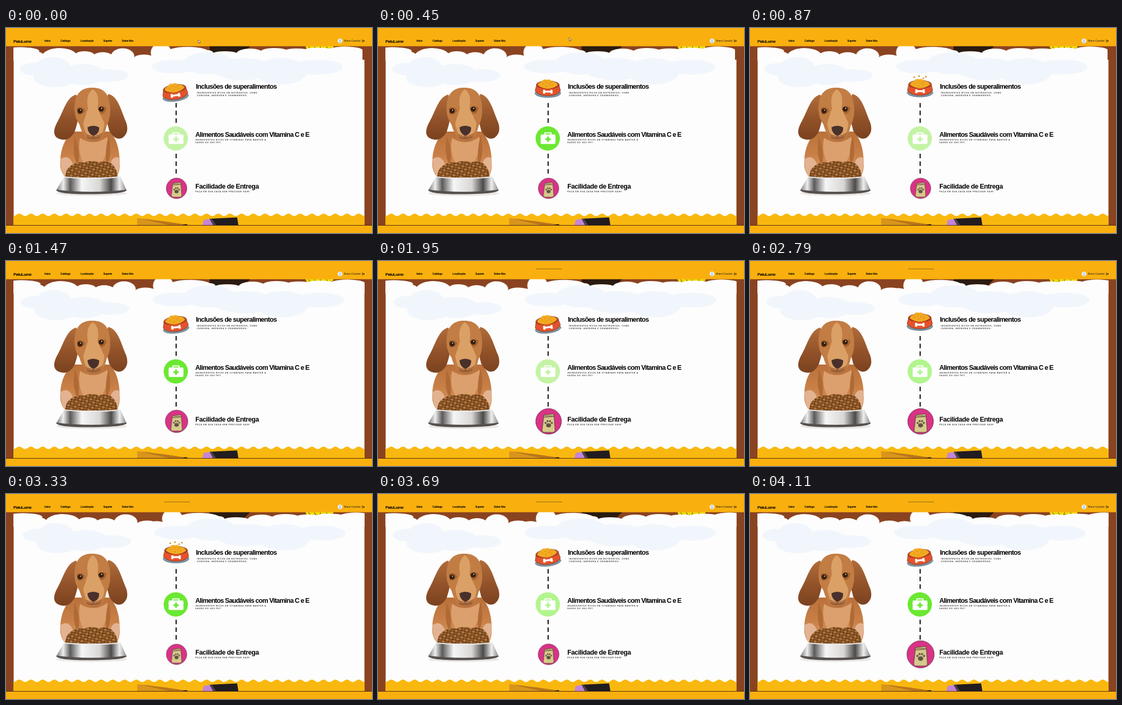
An HTML page for the animation above (4.14 s loop, 692 by 388 pixels).

```html
<!DOCTYPE html>
<html lang="pt">
<head>
<meta charset="utf-8">
<title>PatuLume</title>
<style>
html, body { margin: 0; width: 100%; height: 100%; overflow: hidden; background: #8a4320; }
svg { display: block; width: 692px; height: 388px; }
text { font-family: "Liberation Sans", Arial, sans-serif; font-weight: 700; }
.logo { font-size: 8px; letter-spacing: -.55px; }
.nav { font-size: 5px; letter-spacing: -.35px; }
.user { font: 400 4.9px Roboto, sans-serif; fill: #2b2418; }
.title { font-size: 12.5px; letter-spacing: -.7px; }
.note { font-size: 3.6px; letter-spacing: .83px; fill: #3a3a3a; }

/* Every part shares one loop length. */
.anim { animation: 4.14s linear infinite; }
.haze { animation-name: haze; }
.drift { animation-name: drift; }
.sway { animation-name: sway; }
.bowl { animation-name: bowl; animation-timing-function: ease-in-out; }
.toss { animation-name: toss; }
.kit { animation-name: glow; }
.bag { animation-name: beat; animation-timing-function: ease-in-out; }
.cursor { animation-name: cursor; }
.strip { animation-name: strip; }

@keyframes haze {
  0% { transform: none; }
  21% { transform: translateX(1px); }
  47% { transform: translateX(3px); }
  67% { transform: translateX(5px); }
  82% { transform: translateX(5.5px); }
  100% { transform: translateX(-3px); }
}
@keyframes sway {
  0% { transform: none; }
  80% { transform: translateX(6px); }
  100% { transform: translateX(2px); }
}
@keyframes drift {
  0% { transform: none; }
  35% { transform: translateX(4px); }
  67% { transform: translateX(16px); }
  100% { transform: translateX(29px); }
}
@keyframes bowl {
  0% { transform: translate(319.5px, 121px) rotate(-8deg); }
  8% { transform: translate(321px, 114px); }
  21%, 80.4% { transform: translate(321.5px, 113px); }
  30%, 47.1%, 90%, 100% { transform: translate(320.5px, 119px) rotate(-7deg); }
  59.4% { transform: translate(319.5px, 121px) rotate(-8deg); }
  67.4% { transform: translate(321px, 114px); }
}
@keyframes toss {
  0%, 12%, 29%, 71%, 89%, 100% { transform: translateY(10px); opacity: 0; }
  15%, 26%, 74%, 86% { opacity: 1; }
  21%, 80.4% { transform: none; opacity: 1; }
}
@keyframes glow {
  0%, 4%, 21%, 45%, 52%, 66% { color: #c4f3a6; }
  10%, 15%, 32%, 39%, 55%, 61%, 77.5%, 83.5%, 99%, 100% { color: #6be832; }
  26%, 67.4%, 71%, 89%, 93% { color: #b2f58f; }
}
@keyframes beat {
  0%, 59.4% { transform: translate(322.5px, 303.5px) scale(.757); }
  21%, 80.4% { transform: translate(322.5px, 303.5px) scale(.75); }
  34.3%, 93.7% { transform: translate(322.5px, 303.5px) scale(.77); }
  35.5%, 94.9% { transform: translate(322.5px, 303.5px) scale(.827); }
  39.9%, 99.3%, 100% { transform: translate(322.5px, 303.5px) scale(1); }
  47.1%, 67.4% { transform: translate(322.5px, 303.5px) scale(.942); }
}
@keyframes cursor {
  0%, 4% { transform: none; opacity: 1; }
  13.7% { transform: translate(-3px, -6px); opacity: 1; }
  13.8%, 100% { opacity: 0; }
}
@keyframes strip {
  0%, 40.9% { opacity: 0; }
  41%, 100% { opacity: 1; }
}
</style>
</head>
<body>
<svg viewBox="0 0 692 388">
  <defs>
    <clipPath id="page"><path d="M14.5 34H677.7V374H14.5Z"/></clipPath>
    <pattern id="wave" x="3" y="350" width="22.13" height="8" patternUnits="userSpaceOnUse">
      <path d="M0 1.2C4 1.2 7 5.8 11.07 5.8S18.1 1.2 22.13 1.2V8H0Z" fill="#f9b80f"/>
    </pattern>
    <pattern id="grain" width="13" height="10" patternUnits="userSpaceOnUse" patternTransform="rotate(12)">
      <path d="M0 0H13V10H0Z" fill="#6b3d18"/>
      <g fill="#b27a40"><ellipse cx="3.4" cy="2.6" rx="3" ry="2.1"/><ellipse cx="9.6" cy="7.4" rx="2.8" ry="2.1"/></g>
      <g fill="#965c2a"><ellipse cx="9.8" cy="2.4" rx="2.7" ry="2"/><ellipse cx="3.2" cy="7.4" rx="2.7" ry="1.9"/></g>
    </pattern>
    <linearGradient id="steel">
      <stop stop-color="#777"/><stop offset=".1" stop-color="#eee"/><stop offset=".2" stop-color="#5c5a59"/>
      <stop offset=".36" stop-color="#f6f6f6"/><stop offset=".62" stop-color="#d8d6d5"/>
      <stop offset=".78" stop-color="#4c4a49"/><stop offset=".9" stop-color="#eee"/><stop offset="1" stop-color="#888"/>
    </linearGradient>
    <linearGradient id="fur" x2="0" y2="1">
      <stop stop-color="#b9703a"/><stop offset=".5" stop-color="#c98148"/><stop offset="1" stop-color="#dda273"/>
    </linearGradient>
    <linearGradient id="ear" x2="0" y2="1">
      <stop stop-color="#b06c3a"/><stop offset=".6" stop-color="#8f5028"/><stop offset="1" stop-color="#7a421f"/>
    </linearGradient>
  </defs>

  <path d="M0 0H692V388H0Z" fill="#8a4320"/>

  <g clip-path="url(#page)">
    <path d="M385 34H462L440 56H385Z" fill="#2b1a10"/>
    <path d="M566 34H619V37L614 39 609 42 605 38 600 42 597 38 592 42 588 39 584 43 581 39 576 42 573 39 569 41Z" fill="#efd90c"/>
    <path d="M572 35l4 5M583 35l3 5M595 35l-2 5M606 35l2 4" stroke="#4d4208"/>
    <path d="M14 60H678V356H14Z" fill="#fdfdfd"/>
    <g fill="#fdfdfd">
      <path class="anim sway" d="M-10 62V42a36 7 0 0 1 72 3q5 1 8 4a33 16 0 0 1 62 -1a19 8 0 0 1 35 2a19 9 0 0 1 32 0a22 15 0 0 1 43 7a17 6 0 0 1 38 0V62Z"/>
      <path class="anim drift" d="M245 62V57a20 9 0 0 1 30 -4a18 17 0 0 1 36 -13a40 10 0 0 1 70 2q9 0 11 5a24 5 0 0 1 44 0a26 10 0 0 1 46 -4a28 8 0 0 1 48 -2a24 5 0 0 1 36 -1a26 4 0 0 1 46 -1a34 8 0 0 1 62 2V62Z"/>
    </g>
    <g class="anim haze" fill="#f1f6fc">
      <ellipse cx="54" cy="78" rx="28" ry="12"/>
      <ellipse cx="88" cy="76" rx="34" ry="21"/>
      <ellipse cx="92" cy="94" rx="40" ry="18"/>
      <ellipse cx="145" cy="88" rx="42" ry="20"/>
      <ellipse cx="195" cy="90" rx="36" ry="12"/>
      <ellipse cx="318" cy="73" rx="43" ry="13"/>
      <ellipse cx="382" cy="67" rx="48" ry="21"/>
      <ellipse cx="448" cy="78" rx="58" ry="21"/>
      <ellipse cx="520" cy="82" rx="50" ry="25"/>
      <ellipse cx="590" cy="74" rx="47" ry="14"/>
    </g>

    <path d="M14 357.8H678V374H14Z" fill="#f9b80f"/>
    <path d="M14 350H678V358H14Z" fill="url(#wave)"/>
    <path d="M248 360L272 362 318 374H248Z" fill="#d9951b"/>
    <path d="M256 361L300 366 354 374H312Z" fill="#b9761a"/>
    <path d="M328 374L341 371 344 374Z" fill="#2b1a10"/>
    <path d="M374 363L390 361 396 374H371Z" fill="#c584d6"/>
    <path d="M385 361L437 358.5 439.5 374H392Z" fill="#211c20"/>
    <path d="M385 361L389 360.8 398 374H392Z" fill="#4a434b"/>
  </g>

  <!-- Puppy and steel bowl -->
  <g>
    <ellipse cx="162" cy="313" rx="67" ry="5" fill="#e9e7e5"/>
    <path d="M126 196C108 212 101 236 103 264Q108 288 130 288H200Q216 282 215 256C215 232 210 210 196 196Z" fill="url(#fur)"/>
    <path d="M140 208Q165 225 192 206Q194 240 178 258H148Q134 236 140 208Z" fill="#dba06d"/>
    <path d="M130 206Q142 232 136 262Q124 240 130 206ZM194 204Q186 232 190 262Q202 238 194 204Z" fill="#b06a35"/>
    <path d="M103 248Q118 238 126 256L121 286Q104 284 103 248ZM215 246Q202 240 197 258L202 286Q215 280 215 246Z" fill="#e3b391"/>
    <path d="M133 126C114 130 108 160 96 180Q84 204 101 210Q119 216 130 196Q139 170 138 146Z" fill="url(#ear)"/>
    <path d="M193 125C212 128 218 158 227 178Q234 198 220 208Q206 214 195 194Q188 168 188 144Z" fill="url(#ear)"/>
    <path d="M164 113C145 112 132 122 130 144Q127 166 139 183Q146 211 167 214Q185 212 190 186Q200 166 196 142C193 121 181 113 164 113Z" fill="#c27d44"/>
    <path d="M164 116Q150 126 155 152L146 180Q150 209 167 211Q184 208 186 180L173 152Q178 124 164 116Z" fill="#dba066"/>
    <path d="M134 152Q142 146 150 156Q144 166 136 163ZM174 154Q181 144 190 151Q188 163 179 163Z" fill="#a5622f"/>
    <path d="M150 199Q166 210 183 197Q180 214 167 214Q153 213 150 199Z" fill="#b07040"/>
    <path d="M154 188Q165 182 176 188Q177 200 165 204Q155 200 154 188Z" fill="#4a302b"/>
    <path d="M165 203V208M153 207Q166 211 178 206" fill="none" stroke="#6e4026"/>
    <g fill="#39200f"><ellipse cx="140" cy="157" rx="5" ry="4.8"/><ellipse cx="180" cy="153.5" rx="5" ry="4.8"/></g>
    <g fill="#fff"><circle cx="141" cy="155.4" r="1"/><circle cx="181" cy="152" r="1"/></g>
    <path d="M112 284Q112 268 122 261Q134 252 148 255Q160 249 176 254Q194 250 202 259Q211 268 211 284Z" fill="url(#grain)"/>
    <path d="M109 283H217L228 307Q226 313 162 313T95 307Z" fill="url(#steel)"/>
    <path d="M95 306Q162 314 228 306Q229 314 162 314.5T95 306Z" fill="#55504e"/>
    <path d="M109 282Q162 287 217 282" fill="none" stroke="#e8e8e8" stroke-width="2"/>
  </g>

  <path d="M321.7 142V180M321.7 238V276" stroke="#111" stroke-width="2.2" stroke-dasharray="8.5 6"/>

  <g class="anim bowl">
    <ellipse cy="9.5" rx="24.3" ry="8" fill="#7f9bad" stroke="#3b4a55" stroke-width=".7"/>
    <path d="M-21 -7L-24 5Q-18 14.5 0 14.5T24 5L21 -7Z" fill="#e4522b" stroke="#5a2418" stroke-width=".7"/>
    <ellipse cy="-6.5" rx="21.5" ry="7.5" fill="#c23f22" stroke="#5a2418" stroke-width=".7"/>
    <path d="M-19 -6Q-17 -12 -12 -12Q-9 -18 -2 -16Q4 -18 8 -13Q16 -13 19 -6Q11 1 0 1T-19 -6Z" fill="#f3a920"/>
    <path d="M-10 -8h2M-4 -11h2M2 -8h2M7 -6h2M-3 -4h2M5 -11h2" stroke="#d08a18" stroke-width="1.5"/>
    <path d="M-6 6.5H6" stroke="#fff" stroke-width="3.5"/>
    <g fill="#fff"><circle cx="-7" cy="5" r="2.2"/><circle cx="-7" cy="8.2" r="2.2"/><circle cx="7" cy="5" r="2.2"/><circle cx="7" cy="8.2" r="2.2"/></g>
    <g class="anim toss" fill="#c98a1c">
      <circle cx="-11" cy="-20" r="1.6"/><circle cx="-2" cy="-22" r="1.6"/><circle cx="6" cy="-18" r="1.4"/><circle cx="11" cy="-21" r="1.6"/>
    </g>
  </g>

  <g class="anim kit">
    <circle cx="321" cy="209" r="23" fill="currentColor"/>
    <path d="M315.5 202V198.5H327V202" fill="none" stroke="#fff" stroke-width="2"/>
    <rect x="307.5" y="201.5" width="28" height="18" rx="2" fill="#fff"/>
    <path d="M321.5 205.5V215.5M316.5 210.5H326.5" stroke="currentColor" stroke-width="3.4"/>
  </g>

  <g class="anim bag">
    <circle r="25.7" fill="#d93386" stroke="#6b2249"/>
    <g transform="translate(0 -1)">
      <path d="M-9 -12L10 -14 11 -8 13 18Q13 23 8 23H-8Q-13 23 -13 18L-10 -7Z" fill="#d8c98c" stroke="#4a3c2a"/>
      <path d="M-10 -7L11 -9M-8 -10H9" stroke="#4a3c2a"/>
      <g fill="#5d5142"><ellipse cy="9" rx="5" ry="4.2"/><circle cx="-6" cy="4" r="2"/><circle cx="-2" cy="0.5" r="2"/><circle cx="2.8" cy="0.5" r="2"/><circle cx="6.5" cy="4" r="2"/></g>
    </g>
  </g>

  <text class="title" x="359" y="115">Inclusões de superalimentos</text>
  <text class="note" x="361" y="124">INGREDIENTES RICOS EM NUTRIENTES, COMO</text>
  <text class="note" x="361" y="129">CENOURA, ABÓBORA E CRANBERRIES.</text>
  <text class="title" x="358" y="205.5" style="letter-spacing:-.78px">Alimentos Saudáveis com Vitamina C e E</text>
  <text class="note" x="358" y="213.3">INGREDIENTES RICOS EM VITAMINAS PARA MANTER A</text>
  <text class="note" x="358" y="218">SAÚDE DO SEU PET.</text>
  <text class="title" x="358" y="303.5" style="letter-spacing:-.44px">Facilidade de Entrega</text>
  <text class="note" x="358" y="311">PEÇA EM SUA CASA SEM PRECISAR SAIR!</text>

  <!-- Header and footer bars -->
  <path d="M0 0H692V34.6H0ZM0 374H692V388H0Z" fill="#f9b00e"/>
  <path d="M0 373.5H692" stroke="#4b2a10"/>
  <path class="anim strip" d="M299 15H348" stroke="#8a6418"/>
  <text class="logo" x="14" y="27.5">PatuLume</text>
  <g class="nav">
    <text x="73" y="26">Início</text>
    <text x="103" y="26">Catálogo</text>
    <text x="141" y="26">Localização</text>
    <text x="184" y="26">Suporte</text>
    <text x="219" y="26">Sobre Nós</text>
  </g>
  <circle cx="631.5" cy="24.5" r="4.5" fill="#e6edf4"/>
  <circle cx="631.5" cy="23.3" r="1.3" fill="#a9bac9"/>
  <path d="M629 27.5Q631.5 23.5 634 27.5Z" fill="#a9bac9"/>
  <text class="user" x="639" y="26.3">Breno Cavalari</text>
  <path d="M675 22.4H673.6V26.6H675" fill="none" stroke="#2b2418" stroke-width=".8"/>
  <path d="M674.6 23.9H676V22.5L678.2 24.5 676 26.5V25.1H674.6Z" fill="#2b2418"/>
  <path class="anim cursor" d="M363.5 22.5V28.5L365 27.2 366 29.3 367 28.8 366 26.8H367.7Z" fill="#fff" stroke="#222" stroke-width=".6"/>
</svg>
</body>
</html>
```
